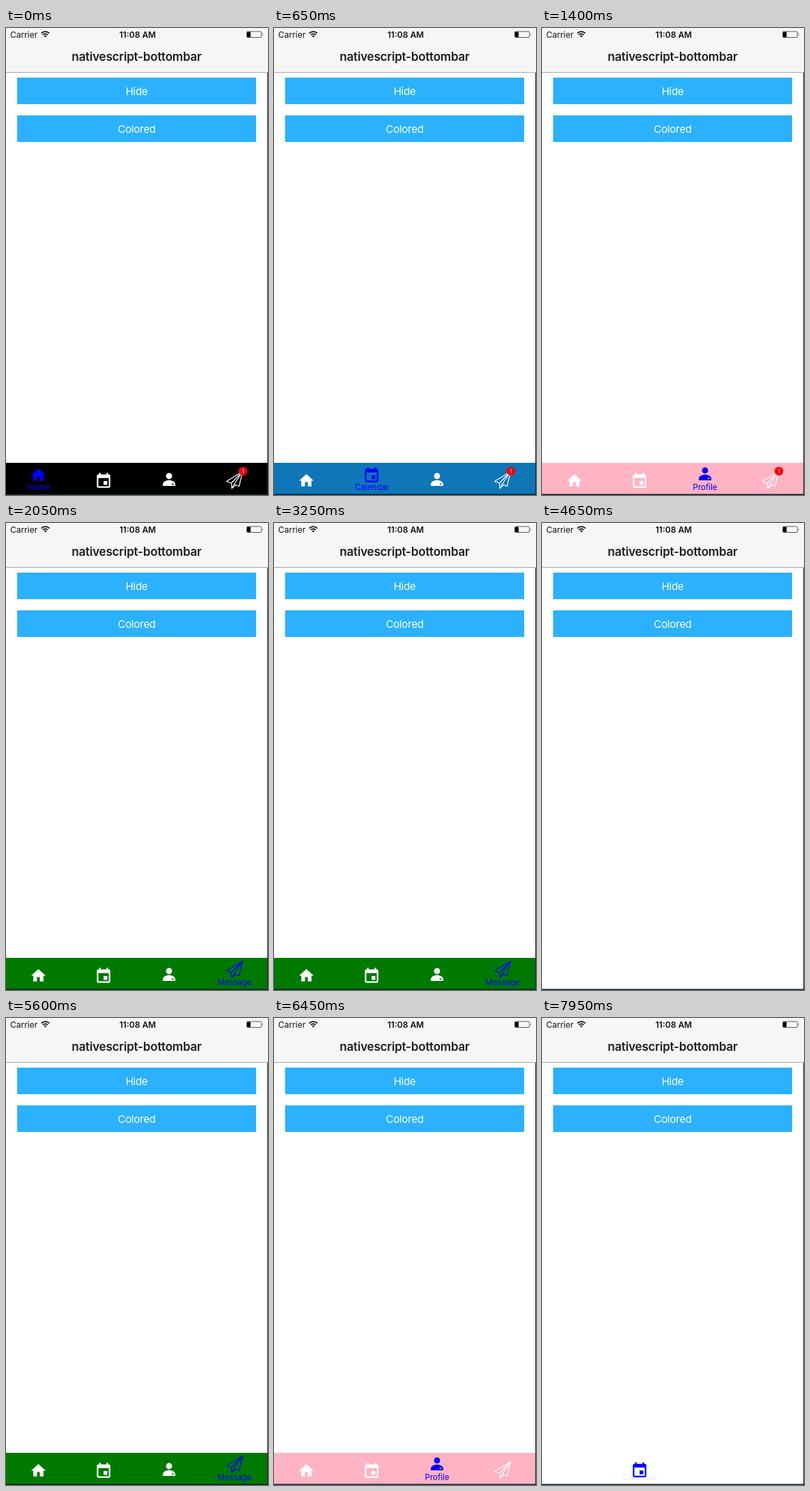
Animation of 376x668 px, one loop 8000 ms. Source, as an HTML page:

```html
<!DOCTYPE html>
<html lang="en">
<head>
<meta charset="utf-8">
<title>Bottom bar</title>
<style>
html, body { margin: 0; width: 100%; height: 100%; overflow: hidden; background: #fff; }
svg { display: block; width: 100%; height: 100%; }
text { font-family: Inter, "Liberation Sans", sans-serif; text-anchor: middle; }
.status { font-size: 12px; fill: #111; }
.title { font-size: 17px; font-weight: 600; letter-spacing: -.2px; fill: #1c1c1c; }
.btn { font-size: 15px; letter-spacing: -.25px; fill: #fff; }
.label { font-size: 11.5px; fill: #00f; }
</style>
</head>
<body>
<svg viewBox="0 0 376 668">
  <rect width="376" height="668" fill="#fff"/>
  <rect width="376" height="63" fill="#f6f6f6"/>
  <rect y="63" width="376" height="1" fill="#a9a9a9"/>

  <text class="status" x="6" y="14" style="text-anchor:start">Carrier</text>
  <g fill="none" stroke="#111" stroke-width="1.7">
    <path d="M50.6 7.6a8 8 0 0 1 11.6 0M52.9 9.9a4.9 4.9 0 0 1 7 0"/>
    <path d="M54.5 11.5a2.7 2.7 0 0 1 3.8 0L56.4 13.6z" fill="#111" stroke="none"/>
  </g>
  <text class="status" x="189" y="14" font-weight="600">11:08 AM</text>
  <rect x="345.5" y="5" width="21" height="8.5" rx="1.5" fill="none" stroke="#333" stroke-width=".8"/>
  <rect x="346" y="5.5" width="5" height="7.5" rx="1" fill="#000"/>
  <path d="M368 7.5q1.6 1.7 0 3.5z" fill="#333"/>
  <text class="title" x="187.5" y="47">nativescript-bottombar</text>

  <g fill="#2bb1fe">
    <rect x="16" y="71" width="343" height="38"/>
    <rect x="16" y="125" width="343" height="38"/>
  </g>
  <text class="btn" id="hide" x="187.5" y="96">Hide</text>
  <text class="btn" id="colored" x="187.5" y="150">Colored</text>

  <g id="bar">
    <rect id="back" y="622" width="376" height="46"/>
    <g class="tab"><path d="M10 20v-6h4v6h5v-8h3L12 3 2 12h3v8z" transform="translate(-12.5 -12)scale(1.04)"/></g>
    <g class="tab"><path d="M17 12h-5v5h5zM16 1v2H8V1H6v2H5a2 2 0 0 0-2 2v14a2 2 0 0 0 2 2h14a2 2 0 0 0 2-2V5a2 2 0 0 0-2-2h-1V1zM19 19H5V8h14z" transform="translate(-12.8 -11.8)scale(1.07)"/></g>
    <g class="tab"><path fill-rule="evenodd" d="M0-10.5a4.4 4.4 0 1 1 0 8.8a4.4 4.4 0 0 1 0-8.8zM-9 8V5.6C-9 2 -4-.2 0-.2S9 2 9 5.6V8zM3 4.8l2.3 2 2.3-2z"/></g>
    <g class="tab plane"><path fill="none" stroke-width="1.2" stroke-linejoin="round" d="M11.5-12.5L-11.5 1.5L-4.5 4L11.5-12.5L-.5 5.5L6.5 8.5zM-4.5 4L-4 11.5L-.5 5.5M-4 11.5L2 6.6"/></g>
    <g id="badge">
      <circle cx="340" cy="634" r="6.2" fill="#f00"/>
      <text x="340" y="636.6" font-size="7" fill="#fff">1</text>
    </g>
    <text class="label" x="46.5" y="661">Home</text>
    <text class="label" x="140.5" y="661">Calendar</text>
    <text class="label" x="234" y="661">Profile</text>
    <text class="label" x="328" y="661">Message</text>
  </g>
  <rect x="375" y="64" width="1" height="604" fill="#25292c"/>
  <rect y="666.5" width="376" height="1.5" fill="#14232c"/>
</svg>
<script>
const LOOP = 8000, REST = 647, LIFT = 8;
const $ = id => document.getElementById(id);
const tabs = [...document.querySelectorAll('.tab')];
const labels = [...document.querySelectorAll('.label')];
const xs = [46.5, 140, 234, 328];
const colors = [[0, 0, 0], [15, 118, 183], [255, 179, 195], [0, 121, 0]];
const white = [255, 255, 255];

// [time, selected tab, bar colour]
const steps = [
  [-1000, 0, colors[0]], [300, 1, colors[1]], [1000, 2, colors[2]],
  [1600, 3, colors[3]], [5850, 2, colors[2]], [6950, 2, white], [7940, 1, white]
];
const slides = [[4050, 0, 46], [5100, 46, 0]];
const taps = { hide: [4050, 5100], colored: [6950] };

const ramp = (t, start, length) => Math.min(1, Math.max(0, (t - start) / length));
const easeOut = p => 1 - (1 - p) * (1 - p);
const mix = (a, b, p) => a + (b - a) * p;

function drawTabs(t) {
  const i = steps.findLastIndex(s => s[0] <= t);
  const [start, on, color] = steps[i];
  const [, was, oldColor] = steps[Math.max(0, i - 1)];
  const p = easeOut(ramp(t, start, 250));
  const fade = color.map((c, k) => Math.round(mix(oldColor[k], c, p)));
  $('back').setAttribute('fill', `rgb(${fade})`);
  tabs.forEach((tab, k) => {
    const up = mix(k === was ? 1 : 0, k === on ? 1 : 0, p);
    const ink = k === on ? '#00f' : '#fff';
    tab.setAttribute('transform', `translate(${xs[k]} ${REST - LIFT * up})`);
    tab.setAttribute('fill', ink);
    tab.setAttribute('stroke', k === 3 ? ink : 'none');
    labels[k].style.opacity = k === on ? up : 0;
  });
  $('badge').style.display = t < steps[3][0] ? '' : 'none';
}

function drawPress(id, t) {
  const dim = taps[id].map(at => t < at - 100 ? 1 : mix(.3, 1, ramp(t, at, 300)));
  $(id).style.opacity = Math.min(...dim.filter((d, k) => t < taps[id][k] + 300), 1);
}

function draw(t) {
  drawTabs(t);
  const slide = slides.findLast(s => s[0] <= t);
  const y = slide ? mix(slide[1], slide[2], easeOut(ramp(t, slide[0], 250))) : 0;
  $('bar').setAttribute('transform', `translate(0 ${y})`);
  drawPress('hide', t);
  drawPress('colored', t);
}

const begin = performance.now();
function tick() {
  draw((performance.now() - begin) % LOOP);
  requestAnimationFrame(tick);
}
tick();
</script>
</body>
</html>
```
